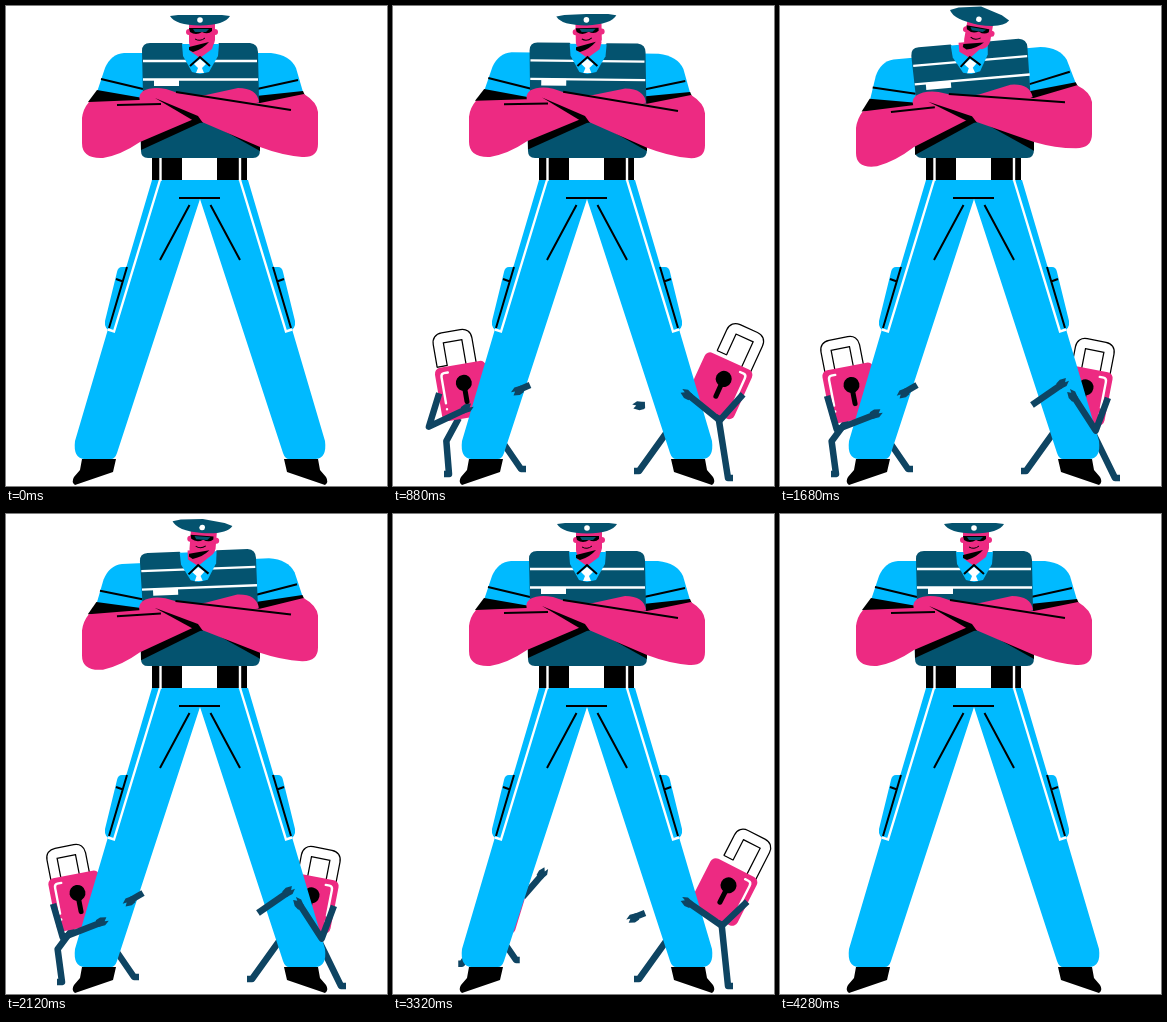
These frames come from a looping animation (381x480 px, 4.32 s). An HTML page:

```html
<!DOCTYPE html>
<html lang="en">
<head>
<meta charset="utf-8">
<title>Guard and padlocks</title>
<style>
  html, body { margin: 0; width: 100%; height: 100%; overflow: hidden; background: #fff; }
  svg { display: block; width: 100vw; height: 100vh; }
  .blue { fill: #00baff; }
  .navy { fill: #04536f; }
  .pink { fill: #ed2a82; }
  .white { fill: #fff; }
  .ink { fill: none; stroke: #000; stroke-width: 2; }
  .trim { fill: none; stroke: #fff; stroke-width: 2.4; }
  .limb { fill: none; stroke: #0e4462; stroke-width: 6.5; stroke-linejoin: round; }
  .hand { fill: #0e4462; }
</style>
</head>
<body>
<svg viewBox="0 0 381 480">
  <defs>
    <g id="leg">
      <path class="blue" d="M195,174H146L69,435Q67,452 78,453H105Q109,453 111,447L194,193H195Z"/>
      <path class="blue" d="M121,261H116Q112,261 111,266L99,315Q98,323 105,325Z"/>
      <path class="ink" d="M121,261L103,322M110,273L117,275.5M183.5,199L154,254"/>
      <path class="trim" d="M154,174L108,325.5L102,323.5"/>
      <path d="M76,453H110L107,466L69,479Q65,476 68,471L74,464Z"/>
    </g>
    <path id="bow" fill="none" d="M-14.5,-23V-46Q-14.5,-51 -9.5,-51H9.5Q14.5,-51 14.5,-46V-12"/>
    <g id="lock">
      <g class="shackle">
        <use href="#bow" stroke="#000" stroke-width="11.5"/>
        <use href="#bow" stroke="#fff" stroke-width="9"/>
        <path d="M-20,-23H-9" stroke="#000" stroke-width="1.2"/>
      </g>
      <rect class="pink" x="-26" y="-27" width="52" height="54" rx="6"/>
      <circle cx="1" cy="-8" r="8"/>
      <path d="M1,-8V11" stroke="#000" stroke-width="5" stroke-linecap="round"/>
    </g>
  </defs>
  <rect width="381" height="480" fill="#fff"/>
  <g id="back"></g>
  <use href="#leg"/>
  <use href="#leg" transform="matrix(-1 0 0 1 388 0)"/>
  <path class="ink" d="M173,192H214"/>
  <rect x="146" y="151" width="95" height="23"/>
  <rect class="white" x="176" y="151" width="35" height="23"/>
  <path class="trim" d="M154.5,151V175M234,151V175"/>
  <g id="torso"></g>
  <g id="head">
    <path class="pink" d="M183,15H209V34Q208,41 202,43H189Q183,42 183,36Z"/>
    <circle class="pink" cx="183" cy="26" r="3"/>
    <circle class="pink" cx="209" cy="26" r="3"/>
    <path d="M183,41L203,36Q197,43 187,46L183,44Z"/>
    <path d="M183,22H206V25Q202,29 196,26Q190,30 184,26Z"/>
    <path class="navy" d="M187,23H203L200,26H189Z"/>
    <path d="M189,33Q194,36 199,32" fill="none" stroke="#000"/>
    <path id="hat" class="navy"/>
    <circle class="white" cx="194" cy="14" r="2.8"/>
  </g>
  <g id="front"></g>
</svg>
<script>
const LOOP = 4320;
const byId = id => document.getElementById(id);
const mix = (a, b, p) => a + (b - a) * p;
const mixAll = (a, b, p) => a.map((v, i) => mix(v, b[i], p));
const ease = p => p * p * (3 - 2 * p);

function add(parent, tag, attrs = {}) {
  const node = document.createElementNS('http://www.w3.org/2000/svg', tag);
  for (const name in attrs) node.setAttribute(name, attrs[name]);
  return parent.appendChild(node);
}

// 0 before start, 1 after end, eased between
const ramp = (t, start, end) => ease(Math.min(1, Math.max(0, (t - start) / (end - start))));

// Each step is [start, end, pose]: move to that pose during that time.
const follow = (first, steps, t) => steps.reduce((pose, [start, end, next]) => mixAll(pose, next, ramp(t, start, end)), first);

// Every "x,y" pair turns with the lean; soft parts stay fixed at the belt.
const torso = [
  ['blue', 'M140,47L118,47Q105,48 99,62L91,86L134,95L140,95Z', 'rigid'],
  ['blue', 'M248,47L265,47Q284,49 290,62L297,86L254,95L248,95Z', 'rigid'],
  ['black', 'M91,84L137,92L137,104L82,96Z', 'rigid'],
  ['black', 'M297,85L250,90L250,104L300,92Z', 'rigid'],
  ['ink', 'M95,73L137,83M251,83L292,74', 'rigid'],
  ['navy', 'M136,45Q136,37 144,37L176,37L194,62L213,37L244,37Q252,38 252,46L254,144Q254,152 247,152L142,152Q135,152 135,145L134,117L137,90Z'],
  ['trim', 'M137,55L251,55M137,73.5L252,73.5'],
  ['white', 'M148,73L173,73L173,80L148,80Z'],
  ['blue', 'M176,38L213,38L212,50L203,66L194,68L186,66L177,50Z'],
  ['pink', 'M184,36L208,36L206,43L194,52L184,45Z'],
  ['ink', 'M184,60L194,51L204,60'],
  ['white', 'M194,53L200,58L196,62L198,67L190,67L192,62L188,58Z'],
  ['black', 'M135,128L180,105L196,116L135,144Z', 'rigid'],
  ['black', 'M195,112L254,131L254,145Z'],
  ['pink', 'M83,96L133,94L200,89L232,82Q251,82 253,96L215,108L188,113L134,136Q115,149 97,152Q76,153 76,137L76,112Q77,103 83,96Z', 'rigid'],
  ['pink', 'M298,88L254,97L172,87L160,83Q146,80 137,85Q131,90 135,97L150,95L196,116L254,141Q275,149 296,151Q312,152 312,138L312,106Q311,96 298,88Z', 'rigid'],
  ['black', 'M149,92L192,110L197,117L188,115Z', 'rigid'],
  ['ink', 'M111,99L155,98M170,86L285,104', 'rigid']
].map(([style, d, rigid]) => ({ d, rigid, node: add(byId('torso'), 'path', { class: style }) }));

function bend({ d, rigid }, lean) {
  return d.replace(/([\d.]+),([\d.]+)/g, (_, xs, ys) => {
    const x = +xs, y = +ys;
    const k = lean * (rigid ? 1 : Math.min(1, Math.max(0, (150 - y) / 70)));
    return (x + k * Math.max(0, 100 - y)).toFixed(2) + ',' + (y + k * (x - 194)).toFixed(2);
  });
}

function drawGuard(t) {
  const tilt = ramp(t, 800, 1170) - 2 * ramp(t, 1360, 1600) + ramp(t, 1960, 2260);
  const size = Math.abs(tilt);
  for (const part of torso) part.node.setAttribute('d', bend(part, 0.085 * tilt));
  byId('head').setAttribute('transform', `translate(0,${-size}) rotate(${-10 * tilt} 195 42)`);
  const side = 9 - 3 * size, crown = 9 - 8 * size;
  byId('hat').setAttribute('d', `M164,10L172,${side}L194,${crown}L216,${side}L224,10Q219,19 194,19.5Q169,19 164,10Z`);
}

// Two bones of fixed length from a to b; returns the whole bent line.
function bentLimb([ax, ay], [bx, by], upper, lower, turn) {
  const dist = Math.hypot(bx - ax, by - ay) || 1;
  const ux = (bx - ax) / dist, uy = (by - ay) / dist;
  const reach = (upper ** 2 - lower ** 2 + dist ** 2) / (2 * dist);
  const along = Math.max(-upper, Math.min(upper, reach, Math.max(upper, dist / 2)));
  const off = turn * Math.sqrt(Math.max(0, upper ** 2 - along ** 2));
  return [[ax, ay], [ax + ux * along - uy * off, ay + uy * along + ux * off], [bx, by]];
}

function makeLock({ side, farShoulder, farHip, nearFoot, farFoot, start, steps }) {
  const back = byId('back'), front = byId('front');
  const legs = [0, 1].map(() => add(back, 'path', { class: 'limb' }));
  const body = byId('lock').cloneNode(true);
  body.removeAttribute('id');
  back.appendChild(body);
  add(body, 'path', { class: 'trim', d: `M${side * 13},-21H${side * 17}Q${side * 20},-21 ${side * 20},-17V9M${side * 20},15v.1`, 'stroke-linecap': 'round' });
  const arms = [0, 1].map(() => {
    const group = add(back, 'g');
    return {
      group,
      line: add(group, 'path', { class: 'limb' }),
      hand: add(group, 'path', { class: 'hand', d: 'M-3,-4L2,-5L8,-3L5,0L9,1L4,4L-3,3Z' })
    };
  });
  const shackle = body.querySelector('.shackle');

  return t => {
    const [x, y, angle, open, shown, nearX, nearY, farX, farY] = follow(start, steps, t);
    const scale = mix(0.65, 1, shown ** 4);
    const cos = Math.cos(angle * Math.PI / 180) * scale, sin = Math.sin(angle * Math.PI / 180) * scale;
    const onBody = (px, py) => [x + px * cos - py * sin, y + px * sin + py * cos];
    const outside = point => mixAll([x, y], point, shown);

    body.setAttribute('transform', `translate(${x},${y}) rotate(${angle}) scale(${scale})`);
    shackle.setAttribute('transform', `translate(${side * 3},${-12 * open})`);

    const armLines = [
      bentLimb(onBody(side * 25, -2), outside([nearX, nearY]), 35 * shown, 40 * shown, -side),
      [outside(farShoulder), outside([farX, farY])]
    ];
    arms.forEach(({ group, line, hand }, i) => {
      const points = armLines[i], [[ax, ay], [bx, by]] = points.slice(-2);
      const turn = Math.atan2(by - ay, bx - ax) * 180 / Math.PI;
      line.setAttribute('d', 'M' + points.join('L'));
      hand.setAttribute('transform', `translate(${bx},${by}) rotate(${turn})`);
      const layer = shown > 0.9 ? front : back;
      if (group.parentNode !== layer) layer.appendChild(group);
    });

    const legLines = [
      bentLimb(onBody(side * 10, 26), outside(nearFoot), 26 * shown, 33 * shown, -side),
      [outside(farHip), outside(farFoot)]
    ];
    legs.forEach((leg, i) => leg.setAttribute('d', 'M' + legLines[i].join('L') + `l${(i ? -side : side) * 5 * shown},0`));
  };
}

// Pose: x, y, angle, opening, shown, near hand x y, far hand x y
const behindLeft = [108, 395, 17, 1, 0, 108, 395, 108, 395];
const outLeft = [70, 382, -8, 1, 1, 41, 396, 129, 380];
const hugLeft = [72, 387, -11, 0, 1, 94, 409, 125, 386];
const peekLeft = [108, 395, 17, 1, 0.75, 108, 395, 162, 350];

const behindRight = [280, 395, -17, 1, 0, 280, 395, 280, 395];
const riseRight = [303, 393, 27, 0.3, 0.87, 310, 400, 285, 392];
const outRight = [331, 378, 27, 0.8, 1, 296, 389, 242, 403];
const hugRight = [303, 389, 11, 0, 1, 294, 391, 281, 379];

const drawLeft = makeLock({
  side: -1, farShoulder: [137, 379], farHip: [104, 428], nearFoot: [56, 468], farFoot: [128, 463],
  start: behindLeft,
  steps: [[320, 600, outLeft], [680, 1040, hugLeft], [2700, 2980, outLeft], [3080, 3310, peekLeft], [3320, 3500, behindLeft]]
});
const drawRight = makeLock({
  side: 1, farShoulder: [252, 399], farHip: [274, 426], nearFoot: [335, 472], farFoot: [246, 465],
  start: behindRight,
  steps: [[260, 580, riseRight], [610, 800, outRight], [800, 1120, hugRight], [2820, 3120, outRight], [3325, 3410, riseRight], [3410, 3700, behindRight]]
});

function frame(now) {
  const t = now % LOOP;
  drawGuard(t);
  drawLeft(t);
  drawRight(t);
  requestAnimationFrame(frame);
}
frame(performance.now());
</script>
</body>
</html>
```
